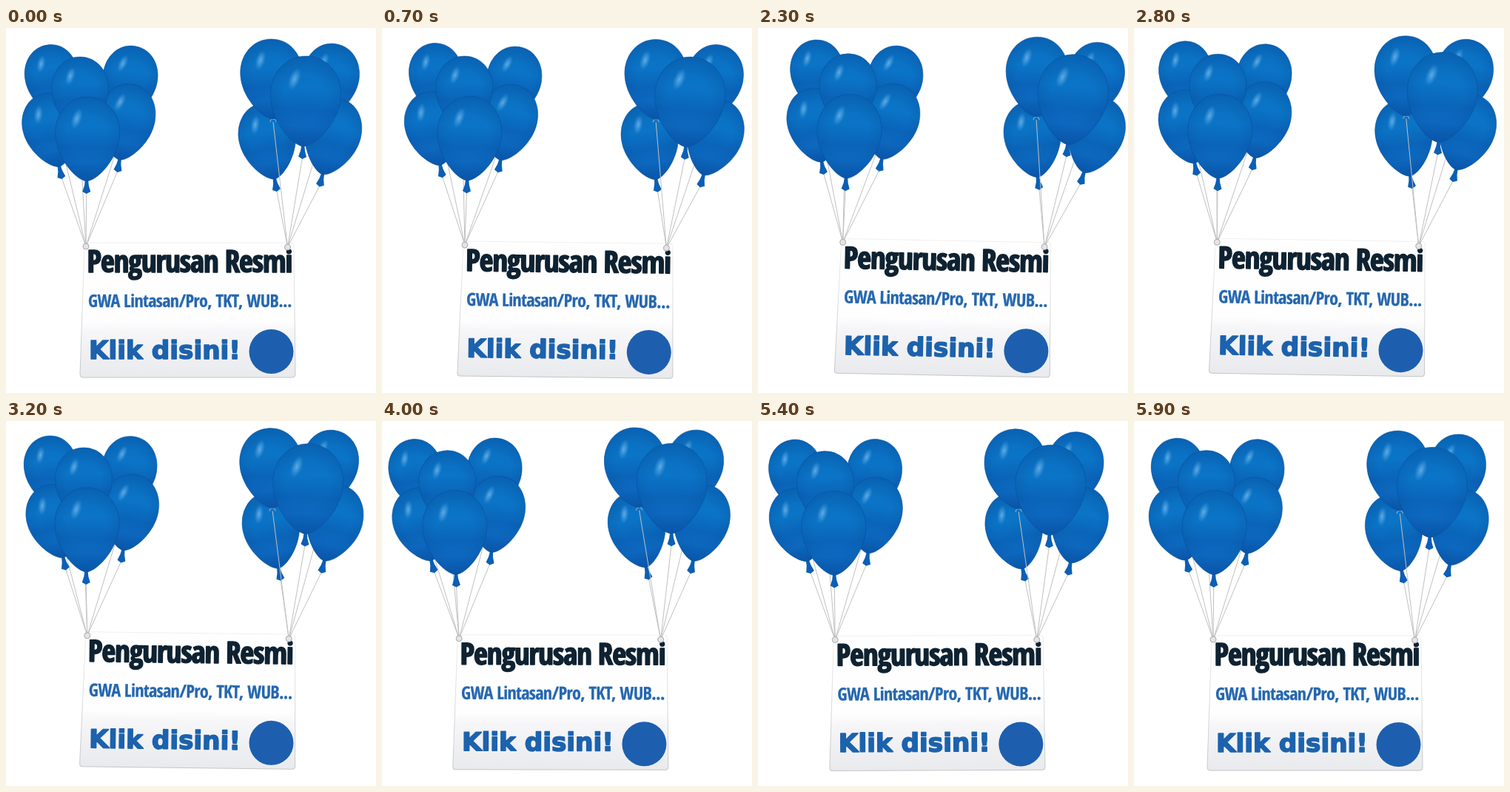
An HTML page with a canvas that plays this animation: 500x493 px, repeating every 6 s.

```html
<!DOCTYPE html>
<html lang="id">
<head>
<meta charset="utf-8">
<title>Pengurusan Resmi</title>
<style>
  html, body { margin: 0; width: 100%; height: 100%; overflow: hidden; background: #fff; }
  canvas { display: block; }
</style>
</head>
<body>
<canvas id="stage" width="500" height="493"></canvas>
<script>
const ctx = document.getElementById('stage').getContext('2d');
const LOOP = 6000, STEP = 100;
const NARROW = '"Open Sans Condensed", "Roboto Condensed", "Noto Sans Condensed", Roboto, "Open Sans", sans-serif';
const rad = deg => deg * Math.PI / 180;

// Smooth periodic curve through one value per key time
const keyTimes = [0, 1500, 2300, 3200, 4000, 4800, 5900];
function curve(...values) {
  const n = keyTimes.length;
  const time = i => keyTimes[(i + n) % n] + Math.floor(i / n) * LOOP;
  const value = i => values[(i + n) % n];
  return t => {
    let i = n - 1;
    while (keyTimes[i] > t) i--;
    const span = time(i + 1) - time(i), s = (t - time(i)) / span, u = 1 - s;
    const slope = j => (value(j + 1) - value(j - 1)) / (time(j + 1) - time(j - 1)) * span;
    return value(i) * (1 + 2 * s) * u * u + slope(i) * s * u * u
      + value(i + 1) * s * s * (3 - 2 * s) - slope(i + 1) * s * s * u;
  };
}

// Every balloon follows the wind by its own gain and trails it by its own lag
const sway = curve(0, 21, 18, -1, -16, -18.5, -2);
const trail = curve(0, .5, 3.2, 6, 4.5, 3.5, 0);

const balloon = (x, y, w, h, tilt, gain, lag, looped = false) => ({ x, y, w, h, tilt, gain, lag, looped });

const left = {
  centre: 112,
  rise: curve(0, -1.5, -3.5, -3, .5, 2, .7),
  roll: curve(0, 3.3, 3.5, -.5, -1.6, -2.2, 0),
  anchor: [108, 295],
  balloons: [
    balloon(62, 70, 72, 95, -6, 1, 0),
    balloon(167, 73, 74, 98, 8, .97, 0),
    balloon(162.5, 127, 76, 104, 10, .75, .9),
    balloon(61.5, 138, 76, 101, -12, .75, 1),
    balloon(100, 89, 77, 100, 0, 1, 1),
    balloon(110, 150, 87, 114, 1, .72, 0)
  ]
};
const right = {
  centre: 398,
  rise: curve(0, .7, -2.3, -7, -7.5, -7.5, -2.5),
  roll: curve(0, 1, .7, -2.5, -2, -2, -1),
  anchor: [380.5, 296],
  balloons: [
    balloon(438.5, 71, 76, 100, 8, .97, 0),
    balloon(440.5, 147, 76, 105, 14, .75, .5),
    balloon(354, 153, 77, 104, -10, .8, 1),
    balloon(359, 69, 84, 108, -2, 1, 0, true),
    balloon(404.5, 99, 95, 122, 3, 1, .7)
  ]
};
const board = {
  pivot: [246, 381],
  dx: curve(0, 5.5, 5, .7, -4, -5.5, -1),
  dy: curve(0, -1, -3, -3.5, -1, -.3, 0),
  roll: curve(0, 1.3, 1.1, .7, .1, -.4, 0)
};

function boardTransform(t) {
  const [px, py] = board.pivot;
  return new DOMMatrix()
    .translate(px + board.dx(t), py + board.dy(t))
    .rotate(board.roll(t))
    .translate(-px, -py);
}

function balloonPose(b, cluster, t) {
  return {
    ...b,
    x: b.x + b.gain * sway(t) + b.lag * trail(t),
    y: b.y + cluster.rise(t) + Math.tan(rad(cluster.roll(t))) * (b.x - cluster.centre),
    tilt: b.tilt + .16 * sway(t)
  };
}

function balloonPath(w, h) {
  const r = w / 2, top = -h / 2, bottom = h / 2, wide = -h * .07;
  ctx.beginPath();
  ctx.moveTo(0, top);
  ctx.bezierCurveTo(r * .58, top, r, top + h * .19, r, wide);
  ctx.bezierCurveTo(r, h * .2, r * .38, bottom - 2, 0, bottom);
  ctx.bezierCurveTo(-r * .38, bottom - 2, -r, h * .2, -r, wide);
  ctx.bezierCurveTo(-r, top + h * .19, -r * .58, top, 0, top);
  ctx.closePath();
}

function glow(x, y, rx, ry, tilt, alpha) {
  ctx.save();
  ctx.translate(x, y);
  ctx.rotate(rad(tilt));
  ctx.scale(rx, ry);
  const soft = ctx.createRadialGradient(0, 0, 0, 0, 0, 1);
  soft.addColorStop(0, `rgba(120,185,235,${alpha})`);
  soft.addColorStop(.5, `rgba(90,170,230,${alpha * .6})`);
  soft.addColorStop(1, 'rgba(70,155,225,0)');
  ctx.fillStyle = soft;
  ctx.fillRect(-1, -1, 2, 2);
  ctx.restore();
}

function drawNeck(end, looped) {
  ctx.beginPath();
  if (looped) {
    ctx.arc(0, end + 4, 4, Math.PI, 2 * Math.PI);
    ctx.strokeStyle = '#b4b8bd';
    ctx.stroke();
    return;
  }
  ctx.moveTo(-2, end - 2);
  ctx.lineTo(2, end - 2);
  ctx.lineTo(3, end + 6);
  ctx.lineTo(5.5, end + 14);
  ctx.lineTo(0, end + 17);
  ctx.lineTo(-5.5, end + 14);
  ctx.lineTo(-3, end + 6);
  ctx.fillStyle = '#0b5fb5';
  ctx.fill();
}

function drawBalloon({ x, y, w, h, tilt, looped }) {
  ctx.save();
  ctx.translate(x, y);
  ctx.rotate(rad(tilt));
  ctx.lineWidth = 1;
  drawNeck(h / 2, looped);

  balloonPath(w, h);
  const body = ctx.createLinearGradient(0, -h / 2, 0, h / 2);
  body.addColorStop(0, '#0a6fc0');
  body.addColorStop(.35, '#0b74c6');
  body.addColorStop(.6, '#0a64b8');
  body.addColorStop(.78, '#0d6cc3');
  body.addColorStop(1, '#0a5cb2');
  ctx.fillStyle = body;
  ctx.fill();

  const shade = ctx.createRadialGradient(0, -h * .05, w * .3, 0, 0, h * .56);
  shade.addColorStop(0, 'rgba(8,76,156,0)');
  shade.addColorStop(1, 'rgba(8,76,156,.5)');
  ctx.fillStyle = shade;
  ctx.fill();

  glow(-w * .17, -h * .24, w * .08, h * .13, 18, .8);
  balloonPath(w, h);
  ctx.strokeStyle = 'rgba(8,78,156,.5)';
  ctx.stroke();
  ctx.restore();
}

function drawString({ x, y, h, tilt, looped }, to) {
  const reach = h / 2 + (looped ? 4 : 15);
  ctx.strokeStyle = '#c0c0c2';
  ctx.lineWidth = 1;
  ctx.beginPath();
  ctx.moveTo(x - Math.sin(rad(tilt)) * reach, y + Math.cos(rad(tilt)) * reach);
  ctx.lineTo(to.x, to.y);
  ctx.stroke();
}

function drawCluster(cluster, t, boardMatrix) {
  const [x, y] = cluster.anchor;
  const knob = boardMatrix.transformPoint({ x, y });
  for (const b of cluster.balloons) {
    const pose = balloonPose(b, cluster, t);
    drawString(pose, knob);
    drawBalloon(pose);
  }
  ctx.beginPath();
  ctx.arc(knob.x, knob.y, 4, 0, 2 * Math.PI);
  ctx.fillStyle = '#e4e4e6';
  ctx.fill();
  ctx.strokeStyle = '#a9a9ad';
  ctx.stroke();
}

// Picks the font size whose natural width suits the line; tracking is in em
function makeLine(text, x, middle, width, style, family, color, tracking, weight) {
  const useSize = size => {
    ctx.font = `${style} ${size}px ${family}`;
    ctx.letterSpacing = `${tracking * size}px`;
  };
  useSize(100);
  useSize(width / ctx.measureText(text).width * 100);
  const baseline = middle + ctx.measureText('K').actualBoundingBoxAscent / 2;
  return { text, x, baseline, font: ctx.font, spacing: ctx.letterSpacing, color, weight };
}

const lines = [
  makeLine('Pengurusan Resmi', 109.5, 315, 277, '900 condensed', NARROW, '#0f2231', -.025, 1.6),
  makeLine('GWA Lintasan/Pro, TKT, WUB...', 111, 368.5, 275, '500 condensed', NARROW, '#2467b0', -.025, .3),
  makeLine('Klik disini!', 112, 434, 205, 'bold', '"DejaVu Sans", sans-serif', '#1c62ad', 0, 1.6)
];

function boardPath() {
  ctx.beginPath();
  ctx.moveTo(110, 290);
  ctx.lineTo(385, 290);
  ctx.quadraticCurveTo(389, 290, 389, 294);
  ctx.lineTo(391, 468);
  ctx.quadraticCurveTo(391, 472, 387, 472);
  ctx.lineTo(104, 472);
  ctx.quadraticCurveTo(100, 472, 100, 468);
  ctx.lineTo(106, 294);
  ctx.quadraticCurveTo(106, 290, 110, 290);
}

function drawBoard(matrix) {
  ctx.save();
  ctx.setTransform(matrix);
  boardPath();
  const paper = ctx.createLinearGradient(0, 290, 0, 472);
  paper.addColorStop(0, '#fefefe');
  paper.addColorStop(.58, '#fefefe');
  paper.addColorStop(.66, '#f6f6f8');
  paper.addColorStop(1, '#e9eaed');
  ctx.fillStyle = paper;
  ctx.fill();
  const edge = ctx.createLinearGradient(0, 290, 0, 472);
  edge.addColorStop(0, '#f0f0f1');
  edge.addColorStop(1, '#c4c5c8');
  ctx.strokeStyle = edge;
  ctx.lineWidth = 1;
  ctx.stroke();

  ctx.lineJoin = 'round';
  for (const line of lines) {
    ctx.font = line.font;
    ctx.letterSpacing = line.spacing;
    ctx.fillStyle = ctx.strokeStyle = line.color;
    ctx.lineWidth = line.weight;
    ctx.fillText(line.text, line.x, line.baseline);
    ctx.strokeText(line.text, line.x, line.baseline);
  }

  ctx.fillStyle = '#1d5fae';
  ctx.beginPath();
  ctx.arc(358.5, 437, 30, 0, 2 * Math.PI);
  ctx.fill();
  ctx.restore();
}

function render(now) {
  const t = Math.floor(now % LOOP / STEP) * STEP;
  const boardMatrix = boardTransform(t);
  ctx.fillStyle = '#fff';
  ctx.fillRect(0, 0, 500, 493);
  drawBoard(boardMatrix);
  drawCluster(left, t, boardMatrix);
  drawCluster(right, t, boardMatrix);
}

const start = performance.now();
function tick() {
  render(performance.now() - start);
  requestAnimationFrame(tick);
}
tick();
</script>
</body>
</html>
```
